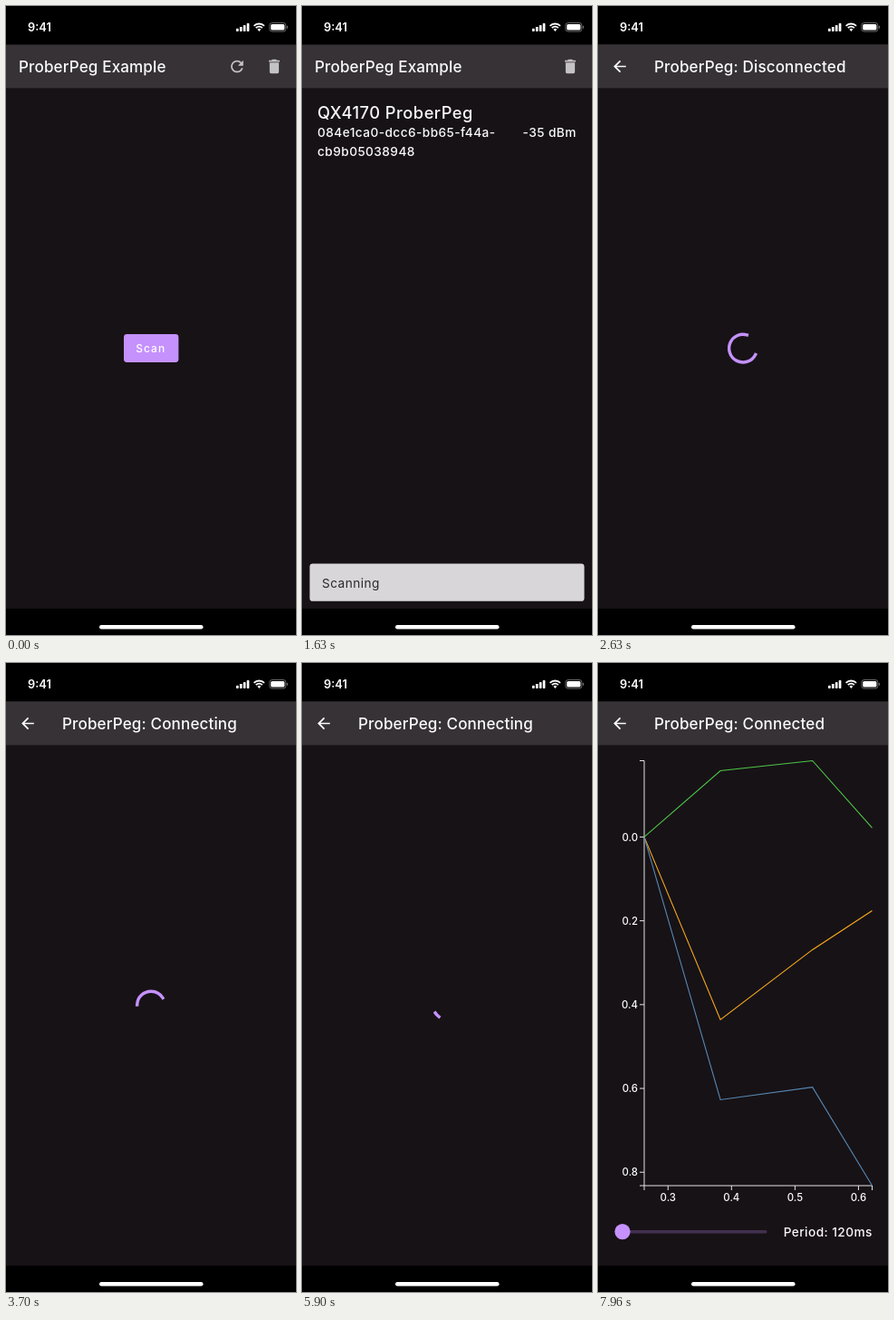
An HTML page with a canvas that plays this animation: 320x692 px, repeating every 8 s.

```html
<!DOCTYPE html>
<html lang="en">
<head>
<meta charset="utf-8">
<title>Sensor demo</title>
<style>
  html, body { margin: 0; width: 100%; height: 100%; overflow: hidden; background: #000; }
  canvas { display: block; width: 320px; height: 692px; }
</style>
</head>
<body>
<canvas id="stage"></canvas>
<script>
const W = 320, H = 692, LOOP = 8000;
const canvas = document.getElementById('stage');
const ctx = canvas.getContext('2d');
const dpr = window.devicePixelRatio || 1;
canvas.width = W * dpr;
canvas.height = H * dpr;

const PURPLE = '#c591fd', BODY = '#171216', BAR = '#363235', WHITE = '#fbfafb', GREY = '#c4c2c4';
const DEVICE = 'ProberPeg';
const ICON = 0.8533;
const icons = {
  back: new Path2D('M20 11H7.83l5.59-5.59L12 4l-8 8 8 8 1.41-1.41L7.83 13H20z'),
  refresh: new Path2D('M17.65 6.35C16.2 4.9 14.21 4 12 4c-4.42 0-7.99 3.58-7.99 8s3.57 8 7.99 8c3.73 0 6.84-2.55 7.73-6h-2.08c-.82 2.33-3.04 4-5.65 4-3.31 0-6-2.69-6-6s2.69-6 6-6c1.66 0 3.14.69 4.22 1.78L13 11h7V4z'),
  trash: new Path2D('M6 19c0 1.1.9 2 2 2h8c1.1 0 2-.9 2-2V7H6zM19 4h-3.5l-1-1h-5l-1 1H5v2h14z')
};

// Moments of the story, in ms
const T = { press: 500, scan: 700, list: 880, tap: 1900, open: 2124, connecting: 3000, connected: 7230, data: 7760 };

const clamp = v => Math.min(1, Math.max(0, v));
const ramp = (t, from, length) => clamp((t - from) / length);

// cubic-bezier(0.4, 0, 0.2, 1)
function ease(x) {
  if (x <= 0) return 0;
  if (x >= 1) return 1;
  let lo = 0, hi = 1, s = 0.5;
  for (let i = 0; i < 24; i++) {
    s = (lo + hi) / 2;
    const bx = 1.2 * s * (1 - s) ** 2 + 0.6 * s * s * (1 - s) + s ** 3;
    if (bx < x) lo = s; else hi = s;
  }
  return 3 * s * s * (1 - s) + s ** 3;
}

function text(str, x, y, { size = 13.65, weight = 450, gap = 0.45, color = WHITE, align = 'left' } = {}) {
  ctx.font = `${weight} ${size}px Inter, Roboto, sans-serif`;
  ctx.letterSpacing = gap + 'px';
  ctx.textAlign = align;
  ctx.fillStyle = color;
  ctx.fillText(str, x, y);
}

function box(x, y, w, h, r, color) {
  ctx.fillStyle = color;
  ctx.beginPath();
  ctx.roundRect(x, y, w, h, r);
  ctx.fill();
}

function disc(x, y, r, color) {
  ctx.fillStyle = color;
  ctx.beginPath();
  ctx.arc(x, y, r, 0, 2 * Math.PI);
  ctx.fill();
}

function icon(name, x, color) {
  ctx.save();
  ctx.translate(x - 12 * ICON, 66.5 - 12 * ICON);
  ctx.scale(ICON, ICON);
  ctx.fillStyle = color;
  ctx.fill(icons[name]);
  ctx.restore();
}

function faded(alpha, draw) {
  if (alpha <= 0) return;
  ctx.save();
  ctx.globalAlpha = alpha;
  draw();
  ctx.restore();
}

function line(points, color, width = 1) {
  ctx.strokeStyle = color;
  ctx.lineWidth = width;
  ctx.beginPath();
  points.forEach(([x, y]) => ctx.lineTo(x, y));
  ctx.stroke();
}

const title = (str, x) => text(str, x, 72.6, { size: 17.07, weight: 500, gap: 0.128 });

function spinner(elapsed) {
  const u = elapsed / 1333 % 1;
  const head = ease(u * 2), tail = ease(u * 2 - 1);
  const start = Math.PI * (-0.5 + 1.5 * tail + 0.5 * u + 2 * elapsed / 2222);
  const sweep = Math.max(1.5 * Math.PI * (head - tail), 0.001);
  ctx.save();
  ctx.strokeStyle = PURPLE;
  ctx.lineWidth = 3.41;
  ctx.lineCap = 'square';
  ctx.beginPath();
  ctx.arc(160, 376.6, 15.36, start, start + sweep);
  ctx.stroke();
  ctx.restore();
}

function statusBar() {
  text('9:41', 24, 28, { size: 12.8, weight: 600, gap: 0, color: '#fff' });
  for (let i = 0; i < 4; i++) {
    const h = 3.2 + i * 1.9;
    box(254 + i * 3.9, 28 - h, 2.7, h, 0.7, '#fff');
  }
  ctx.strokeStyle = '#fff';
  ctx.lineWidth = 1.8;
  for (const r of [8.1, 5]) {
    ctx.beginPath();
    ctx.arc(279.3, 27.6, r, -Math.PI * 0.75, -Math.PI * 0.25);
    ctx.stroke();
  }
  ctx.fillStyle = '#fff';
  ctx.beginPath();
  ctx.moveTo(279.3, 28);
  ctx.arc(279.3, 27.6, 2.7, -Math.PI * 0.75, -Math.PI * 0.25);
  ctx.fill();
  ctx.strokeStyle = '#77757a';
  ctx.lineWidth = 0.9;
  ctx.beginPath();
  ctx.roundRect(290.8, 18.6, 18, 9.4, 2.7);
  ctx.stroke();
  box(292.2, 20, 15.2, 6.6, 1.5, '#fff');
  box(309.8, 21.8, 1.1, 3, 0.5, '#77757a');
}

function pageBackground() {
  ctx.fillStyle = BODY;
  ctx.fillRect(0, 90, W, 573);
  ctx.fillStyle = BAR;
  ctx.fillRect(0, 42.5, W, 47.8);
}

function shell() {
  ctx.fillStyle = '#000';
  ctx.fillRect(0, 0, W, H);
  pageBackground();
  statusBar();
  box(103, 681, 114.5, 4.4, 2.2, '#fff');
}

function signal(t) {
  if (t < 1360) return [-41, -38][Math.floor((t - T.list) / 240) % 2];
  if (t < 1630) return [-37, -40, -36, -39][Math.floor((t - 1360) / 68) % 4];
  return t < 1760 ? -35 : -37;
}

function scanPage(t) {
  title(DEVICE + ' Example', 14);
  icon('trash', 296, GREY);
  if (t < T.scan) {
    icon('refresh', 255, GREY);
    box(130, 361, 60.4, 31, 3.4, PURPLE);
    const press = ramp(t, T.press, 200);
    if (press > 0) {
      ctx.save();
      ctx.beginPath();
      ctx.roundRect(130, 361, 60.4, 31, 3.4);
      ctx.clip();
      disc(160, 376.5, 8 + 27 * press, 'rgba(255,255,255,.22)');
      ctx.restore();
    }
    text('Scan', 143.2, 381, { size: 11.95, weight: 500, gap: 1.07, color: '#fff' });
    return;
  }
  if (t < T.list) {
    spinner(t - T.scan);
  } else {
    const tap = ramp(t, T.tap, 220);
    if (tap > 0) {
      ctx.fillStyle = `rgba(255,255,255,${0.08 * tap})`;
      ctx.fillRect(0, 98, W, 78);
    }
    text('QX4170 ' + DEVICE, 17, 124, { size: 18.3, gap: 0.5 });
    text('084e1ca0-dcc6-bb65-f44a-', 17, 144);
    text('cb9b05038948', 17, 164.5);
    text(signal(t) + ' dBm', 302.8, 144, { align: 'right' });
  }
  faded(ramp(t, T.scan + 100, 150), () => {
    box(8.5, 613.5, 303, 41.3, 3.4, '#d9d6da');
    text('Scanning', 22, 640, { weight: 400, color: '#2b282c' });
  });
}

const times = [0.2625, 0.3825, 0.5275, 0.6215];
const series = [
  { color: '#4ec748', values: [0, -0.158, -0.182, -0.022] },
  { color: '#f9ab1c', values: [0, 0.436, 0.269, 0.176] },
  { color: '#5688b4', values: [0, 0.627, 0.597, 0.832] }
];
const plot = { left: 51, right: 302.5, top: 107.5, bottom: 575 };

function ticks(min, max) {
  const raw = (max - min) / 5;
  const power = Math.floor(Math.log10(raw));
  const ratio = raw / 10 ** power;
  const step = 10 ** power * (ratio >= 7.07 ? 10 : ratio >= 3.16 ? 5 : ratio >= 1.41 ? 2 : 1);
  const digits = Math.max(0, -Math.floor(Math.log10(step) + 1e-9));
  const out = [];
  for (let i = Math.ceil(min / step - 1e-9); i * step <= max + 1e-9; i++) {
    const sign = i < 0 ? '-' : '';
    out.push({ value: i * step, label: sign + Math.abs(i * step).toFixed(digits) });
  }
  return out;
}

function chart(count) {
  const { left, right, top, bottom } = plot;
  const axis = '#e4e2e4';
  line([[left - 5, top], [left, top], [left, bottom], [left - 5, bottom]], axis);
  line([[left, bottom + 5], [left, bottom], [right, bottom], [right, bottom + 5]], axis);
  if (count < 2) return;

  const xs = times.slice(0, count);
  const ys = series.flatMap(s => s.values.slice(0, count));
  const x0 = xs[0], x1 = xs[count - 1];
  const y0 = Math.min(...ys), y1 = Math.max(...ys);
  const px = v => left + (v - x0) / (x1 - x0) * (right - left);
  const py = v => top + (v - y0) / (y1 - y0) * (bottom - top);

  for (const { value, label } of ticks(y0, y1)) {
    const y = py(value);
    line([[left - 5, y], [left, y]], axis);
    text(label, 44, y + 4.1, { size: 11.4, gap: 0, align: 'right' });
  }
  for (const { value, label } of ticks(x0, x1)) {
    const x = px(value);
    line([[x, bottom], [x, bottom + 5]], axis);
    text(label, x, 592, { size: 11.4, gap: 0, align: 'center' });
  }
  for (const { color, values } of series) {
    line(xs.map((x, i) => [px(x), py(values[i])]), color, 1.1);
  }
}

function devicePage(t) {
  icon('back', 24, WHITE);
  const state = t < T.connecting ? 'Disconnected' : t < T.connected ? 'Connecting' : 'Connected';
  title(DEVICE + ': ' + state, 62);
  if (t < T.connected) {
    spinner(t - T.open);
    return;
  }
  const count = t < T.data ? 0 : Math.min(4, 1 + Math.floor((t - T.data) / 66));
  chart(count);
  box(27, 624, 159.5, 3.4, 1.7, '#433050');
  disc(27, 625.6, 8.6, PURPLE);
  text('Period: 120ms', 302.8, 631.2, { align: 'right' });
}

function render(t) {
  ctx.setTransform(dpr, 0, 0, dpr, 0, 0);
  shell();
  const shown = ease(ramp(t, T.open, 300));
  if (shown < 1) scanPage(t);
  // The new page covers the old one while it fades in
  faded(shown, () => {
    pageBackground();
    devicePage(t);
  });
}

const begin = performance.now();
function tick() {
  render((performance.now() - begin) % LOOP);
  requestAnimationFrame(tick);
}
tick();
</script>
</body>
</html>
```
